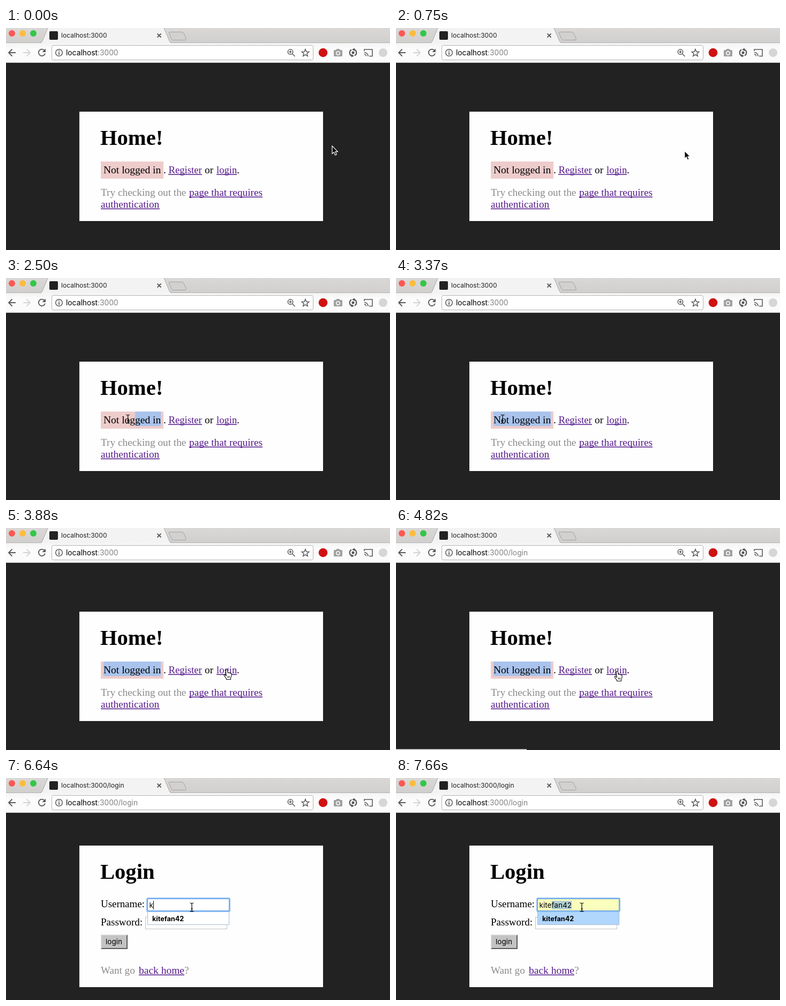
These frames come from a looping animation (717 px wide and 414 px high, 8 s). An HTML page:

```html
<!DOCTYPE html>
<html lang="en">
<head>
<meta charset="utf-8">
<title>Login demo</title>
<style>
html, body { margin: 0; width: 100%; height: 100%; overflow: hidden; background: #222; }
svg { display: block; }
text { font-family: Inter, Roboto, sans-serif; font-size: 13.6px; white-space: pre; }
.page text { font: 19.3px "Liberation Serif", "Noto Serif", serif; }
.page .h1 { font-weight: bold; font-size: 40.6px; }
.page .ui { font: 13.6px Inter, Roboto, sans-serif; }
.page .bold { font: bold 12.6px Inter, Roboto, sans-serif; }
.page .link { fill: #551a8b; }
.page .muted { fill: #8a8a8a; }
.under { stroke: #551a8b; stroke-width: 1.5; }
.icon { fill: none; stroke: #5a5a5a; stroke-width: 1.8; }
</style>
</head>
<body>
<svg width="717" height="414" viewBox="0 0 717 414">
  <defs>
    <linearGradient id="strip" x2="0" y2="1"><stop stop-color="#dad8d7"/><stop offset="1" stop-color="#d1cfce"/></linearGradient>
    <linearGradient id="bar" x2="0" y2="1"><stop stop-color="#f4f4f4"/><stop offset=".3" stop-color="#fbfbfb"/></linearGradient>
  </defs>

  <!-- tab strip -->
  <rect width="717" height="28" fill="url(#strip)"/>
  <path d="M0 27.5H717" stroke="#b4b2b1"/>
  <circle cx="11" cy="10" r="6" fill="#fc5753"/>
  <circle cx="31" cy="10" r="6" fill="#fdbc40"/>
  <circle cx="51" cy="10" r="6" fill="#33c748"/>
  <path d="M64 28.5Q67 27 68 24L78 0H295L305 24Q306 27 309 28.5Z" fill="#f3f3f3"/>
  <path d="M64 27.5Q67 27 68 24L78 0M295 0L305 24Q306 27 309 27.5" fill="none" stroke="#a9a7a6"/>
  <path d="M306 7.5H328Q331 7.5 332 10L336 19Q337 22.5 334 22.5H313Q310 22.5 309 20L304.500 10Q303.500 7.500 306 7.500Z" fill="#d3d1d0" stroke="#a5a3a2"/>
  <rect x="81" y="6" width="16" height="16" rx="2" fill="#222"/>
  <text id="title" x="103" y="18" style="font-size:12.1px" fill="#222"></text>
  <path class="icon" d="M282.500 10.500L289.500 17.500M289.500 10.500L282.500 17.500"/>

  <!-- toolbar -->
  <rect y="28" width="717" height="37" fill="url(#bar)"/>
  <path d="M0 64.5H717" stroke="#c4c4c4"/>
  <path class="icon" d="M18 46H5M11.500 39.500L5 46L11.500 52.500"/>
  <path class="icon" d="M32 46H45M38.500 39.500L45 46L38.500 52.500" style="stroke:#d4d4d4"/>
  <path class="icon" d="M72 42A6.200 6.200 0 1 0 73 47.500"/>
  <path d="M74 38.500V45H67.500Z" fill="#5a5a5a"/>
  <rect x="85.500" y="32.500" width="488" height="27" rx="3" fill="#fff" stroke="#b3b3b3"/>
  <circle class="icon" cx="99" cy="46" r="6.300" style="stroke-width:1.500"/>
  <path class="icon" d="M99 45V50M99 42V43.700"/>
  <text x="112" y="51" style="font-size:13.8px">localhost<tspan id="path" fill="#808080"></tspan></text>
  <g class="icon" style="stroke-width:1.500">
    <circle cx="531" cy="44.500" r="4.700"/>
    <path d="M534.500 48L539.500 53M528.500 44.500H533.500M531 42V47"/>
    <path d="M559 39.500L560.900 44.200L565.800 44.500L562 47.700L563.200 52.500L559 49.900L554.800 52.500L556 47.700L552.200 44.500L557.100 44.200Z"/>
  </g>
  <circle cx="592" cy="46" r="8.300" fill="#cf1111"/>
  <path d="M613.500 41H616L617.500 39H622.500L624 41H626.500Q628 41 628 42.500V51.500Q628 53 626.500 53H613.500Q612 53 612 51.500V42.500Q612 41 613.500 41Z" fill="#a0a0a0"/>
  <circle cx="620" cy="47" r="3.200" fill="#a0a0a0" stroke="#fbfbfb" stroke-width="1.500"/>
  <path class="icon" d="M645 40.500A6.300 6.300 0 0 0 646 52M651 51.500A6.300 6.300 0 0 0 650 40" style="stroke-width:2.200"/>
  <path d="M645 49V54.500L650 52ZM651 37.500V43L646 40Z" fill="#555"/>
  <circle cx="648" cy="46" r="2.500" fill="#555"/>
  <path class="icon" d="M669 43V40H684V52.500H678M669 45.500A7 7 0 0 1 676 52.500M669 49A3.500 3.500 0 0 1 672.500 52.500" style="stroke-width:1.600"/>
  <circle cx="704" cy="46" r="8" fill="#d6d6d6"/>

  <!-- pages -->
  <rect y="65" width="717" height="349" fill="#222"/>
  <g id="home" class="page">
    <rect x="137" y="156" width="455" height="204" fill="#fefefe"/>
    <text class="h1" x="176" y="218">Home!</text>
    <rect x="177" y="249" width="117" height="32" fill="#eecccc"/>
    <rect id="mark" y="249" height="27" fill="#a9c3ec"/>
    <text id="status" x="182" y="271" style="font-size:19.5px">Not logged in</text>
    <text x="294" y="271">.</text>
    <text class="link" x="303.500" y="271" style="font-size:18.7px">Register</text>
    <text x="371" y="271">or</text>
    <text class="link" x="393" y="271" style="font-size:18.6px">login</text>
    <text x="431" y="271">.</text>
    <text class="muted" x="177" y="313">Try checking out the</text>
    <text class="link" x="342" y="313">page that requires</text>
    <text class="link" x="177" y="335">authentication</text>
    <path class="under" d="M303 273.250H366M393 273.250H431M342 315.250H479M177 337.250H287"/>
  </g>
  <g id="login" class="page">
    <rect x="137" y="126" width="455" height="264" fill="#fefefe"/>
    <text class="h1" x="176" y="188">Login</text>
    <text x="177" y="241" style="font-size:18.9px">Username:</text>
    <text x="177" y="275" style="font-size:19px">Password:</text>
    <rect x="260.500" y="259.500" width="152" height="22" fill="#fff" stroke="#c2c2c2"/>
    <rect x="177" y="292" width="50" height="27" fill="#5c5c5c"/>
    <path d="M177 319V292H227L225 294H179V317Z" fill="#dcdcdc"/>
    <rect x="178.500" y="293.500" width="46.500" height="23.500" fill="#c3c3c3"/>
    <text class="ui" x="186" y="310">login</text>
    <text class="muted" x="177" y="365" style="font-size:19.1px">Want go</text>
    <text class="link" x="248" y="365" style="font-size:19.5px">back home</text>
    <text class="muted" x="333" y="365">?</text>
    <path class="under" d="M248 367.250H333"/>
    <g id="list">
      <rect id="option" x="264.500" y="248.500" width="152" height="25" stroke="#a9bccf"/>
      <text class="bold name" x="273" y="267"></text>
    </g>
    <rect id="glow" x="263.500" y="224.500" width="154" height="24" rx="2" fill="none" stroke="#8dbdf3" stroke-width="3"/>
    <rect id="field" x="264.500" y="225.500" width="152" height="22"/>
    <rect id="pick" y="229" height="16" fill="#b2d0d2"/>
    <text id="typed" class="ui" x="267.500" y="242"></text>
    <rect id="caret" y="229" width="1" height="16"/>
  </g>
  <rect id="bubble" y="412.500" width="244" height="2" fill="#f4f4f4"/>

  <!-- pointers -->
  <path id="arrow" d="M0 0V14.500L3.300 11.500L5.600 17L8.200 15.900L5.900 10.600H10.400Z" stroke="#fff" stroke-width="1.200"/>
  <path id="beam" d="M-3.500 -8Q0 -8 0 -6Q0 -8 3.500 -8M0 -6V6M-3.500 8Q0 8 0 6Q0 8 3.500 8M-2 3H2" fill="none" stroke="#000" stroke-width="1.200"/>
  <path id="hand" d="M-1.700 1.500Q-1.700 0 -.2 0Q1.300 0 1.500 1.500L2.300 6Q3.500 4.800 4.600 6.200Q6 5.300 6.900 7Q8.800 6.500 9 8.800V12L7.500 15.500V18.500H-.5V17L-4.600 11.600Q-5.400 9.600 -3.500 9.500L-.8 11.500ZM2.500 12V15.500M5 12V15.500" fill="#fff" stroke="#111" stroke-width="1.100"/>
</svg>
<script>
const LOOP = 8000, NAME = "kitefan42";
const CLICK = 4470, SWITCH = 4880, FOCUS = 5720, CHOOSE = 7660;
const KEYS = [6640, 6740, 6840, 6940];

const smooth = u => u * u * (3 - 2 * u);
const slowing = u => 1 - (1 - u) ** 2;
// start, end, x, y, easing
const MOVES = [
  [540, 1250, 279, 263, smooth],
  [1460, 1820, 282.5, 263, smooth],
  [2089, 2090, 285, 263, smooth],
  [2390, 2710, 185, 263, slowing],
  [3280, 3880, 412, 264, smooth],
  [3900, 4020, 413, 267, smooth],
  [4920, 5420, 361, 247, smooth],
  [5510, 5720, 347, 241, smooth]
];

const $ = id => document.getElementById(id);
const set = (id, attrs) => { for (const k in attrs) $(id).setAttribute(k, attrs[k]); };
const show = (id, on) => { $(id).style.display = on ? "" : "none"; };
const ramp = (t, a, b) => Math.min(1, Math.max(0, (t - a) / (b - a)));

function pointer(t) {
  let x = 609, y = 220;
  for (const [a, b, toX, toY, ease] of MOVES) {
    const u = ease(ramp(t, a, b));
    x += (toX - x) * u;
    y += (toY - y) * u;
  }
  return { x, y };
}

function pointerKind({ x, y }, onLogin) {
  if (onLogin) return x > 264 && x < 417 && y > 226 && y < 246 ? "beam" : "arrow";
  if (y < 252 || y > 278 || x < 177 || x > 436) return "arrow";
  return (x > 303 && x < 366) || (x > 393 && x < 431) ? "hand" : "beam";
}

// Selection grows to the letter edge nearest the slightly earlier pointer.
function drawSelection(t) {
  show("mark", t >= 2390);
  const text = $("status"), count = text.getNumberOfChars();
  const end = text.getEndPositionOfChar(count - 1).x;
  const goal = pointer(Math.min(t, 2740) - 30).x;
  let start = end;
  for (let i = 0; i < count; i++) {
    const edge = text.getStartPositionOfChar(i).x;
    if (Math.abs(edge - goal) < Math.abs(start - goal)) start = edge;
  }
  set("mark", { x: start, width: end - start });
}

function drawForm(t) {
  const keys = KEYS.filter(k => t >= k).length, chosen = t >= CHOOSE;
  const text = $("typed");
  text.textContent = chosen ? NAME : NAME.slice(0, keys);
  const typedEnd = 267.5 + (keys ? text.getSubStringLength(0, keys) : 0);
  show("glow", t >= FOCUS);
  set("field", {
    fill: chosen ? "#fbffbd" : "#fff",
    stroke: t >= FOCUS ? "#5f9fe6" : "#c2c2c2"
  });
  show("list", keys);
  set("option", { fill: chosen ? "#b1d6fd" : "#fff" });
  show("pick", chosen);
  if (chosen) set("pick", { x: typedEnd, width: text.getComputedTextLength() + 267.5 - typedEnd });
  show("caret", (t >= FOCUS && t < 6190) || (t >= KEYS[0] && t < 7420));
  set("caret", { x: Math.round(typedEnd) });
}

function draw(t) {
  const onLogin = t >= SWITCH;
  show("home", !onLogin);
  show("login", onLogin);
  $("title").textContent = "localhost:3000" + (onLogin ? "/login" : "");
  $("path").textContent = ":3000" + (t >= CLICK ? "/login" : "");
  if (onLogin) drawForm(t);
  else drawSelection(t);
  set("bubble", {
    opacity: ramp(t, 1060, 1200) - ramp(t, 1460, 1820) + ramp(t, 3930, 4020) - ramp(t, 4850, 5100)
  });
  const p = pointer(t), kind = pointerKind(p, onLogin);
  for (const id of ["arrow", "beam", "hand"]) show(id, id === kind);
  set(kind, { transform: `translate(${p.x} ${p.y})` });
}

document.querySelector(".name").textContent = NAME;
const begin = performance.now();
function tick() {
  draw((performance.now() - begin) % LOOP);
  requestAnimationFrame(tick);
}
tick();
</script>
</body>
</html>
```
